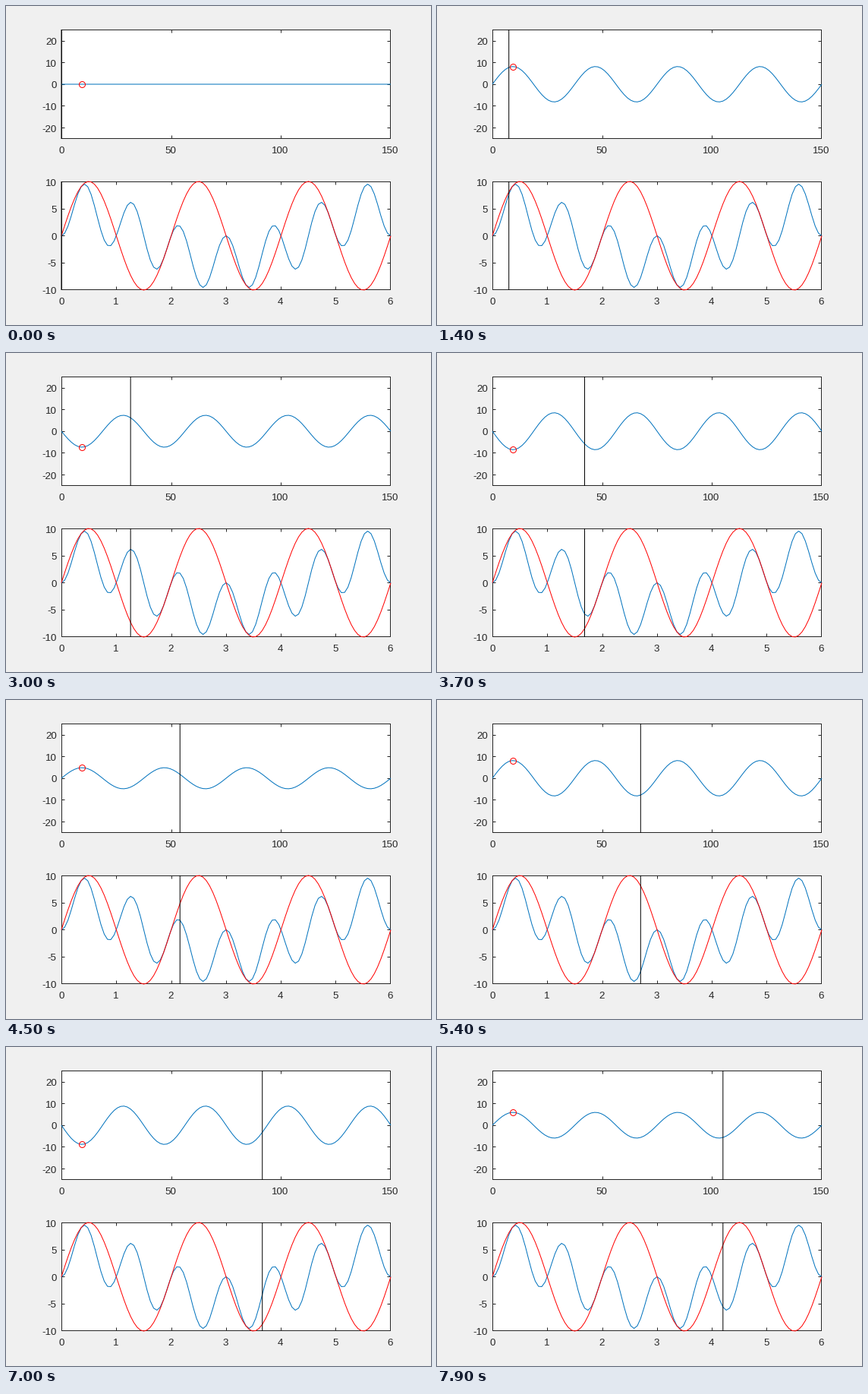
A matplotlib script for the animation above (8000 ms loop, 560 by 420 pixels).

```python
import numpy as np
import matplotlib.pyplot as plt
from matplotlib.animation import FuncAnimation
from matplotlib.transforms import ScaledTranslation

W, H, DPI = 560, 420, 80
PX = 72 / DPI                     # one pixel in points
BLUE, GREY = "#0072BD", "#262626"
LEFT, RIGHT = 73, 507
AMP, WAVELENGTH, SPEED = 10, 37.5, 25
HOLD, STEP, FRAMES = 9, 0.06, 80

plt.rcParams.update({
    "font.family": "Liberation Sans",
    "font.size": 13.33 * PX,
    "axes.unicode_minus": False,
    "axes.linewidth": PX,
    "axes.edgecolor": GREY,
    "lines.linewidth": PX,
    "lines.solid_capstyle": "butt",
})

fig = plt.figure(figsize=(W / DPI, H / DPI), dpi=DPI, facecolor="#F0F0F0")


def add_axes(left, top, right, bottom, xlim, ylim):
    """Axes placed by pixel edges, measured from the top left corner."""
    ax = fig.add_axes([left / W, 1 - bottom / H, (right - left) / W, (bottom - top) / H])
    ax.set(xlim=xlim, ylim=ylim)
    return ax


def make_plot(top, bottom, xlim, ylim, xticks, yticks):
    # The frame sits on the outermost pixels inside the plot area.
    frame = add_axes(LEFT + 0.2, top + 0.2, RIGHT - 0.6, bottom - 0.6, xlim, ylim)
    frame.set(xticks=xticks, yticks=yticks)
    frame.tick_params(direction="in", top=True, right=True, length=4.34 * PX,
                      width=PX, color=GREY, labelcolor=GREY)
    frame.tick_params(axis="x", pad=10 * PX)
    frame.tick_params(axis="y", pad=6 * PX)
    nudge = ScaledTranslation(-0.5 / DPI, -1 / DPI, fig.dpi_scale_trans)
    for label in frame.get_xticklabels() + frame.get_yticklabels():
        label.set_transform(label.get_transform() + nudge)

    data = add_axes(LEFT, top, RIGHT, bottom, xlim, ylim)
    data.set_axis_off()
    return data


def draw(ax, x, y, color, **style):
    return ax.plot(x, y, color=color, clip_on=False, snap=False, **style)[0]


def height(x, t):
    """Standing wave at place x and time t."""
    return AMP * np.sin(np.pi * t) * np.sin(2 * np.pi * x / WAVELENGTH)


space = make_plot(31, 175, (0, 150), (-25, 25),
                  range(0, 151, 50), range(-20, 21, 10))
time = make_plot(231, 374, (0, 6), (-10, 10),
                 range(7), range(-10, 11, 5))

xs = np.linspace(0, 150, 101)
ts = np.linspace(0, 6, 101)
crest = WAVELENGTH / 4

wave = draw(space, xs, 0 * xs, BLUE)
ring = draw(space, [crest], [0], "red", marker="o", markersize=8 * PX,
            markerfacecolor="none", markeredgewidth=PX, linestyle="none")
front = draw(space, [0, 0], [-25, 25], "black")

draw(time, ts, height(SPEED * ts, ts), BLUE)
draw(time, ts, height(crest, ts), "red")
cursor = draw(time, [0, 0], [-10, 10], "black")


def update(frame):
    t = STEP * max(0, frame - HOLD)
    wave.set_ydata(height(xs, t))
    ring.set_ydata([height(crest, t)])
    front.set_xdata([SPEED * t] * 2)
    cursor.set_xdata([t, t])
    return wave, ring, front, cursor


anim = FuncAnimation(fig, update, frames=FRAMES, interval=100,
                     repeat=True, repeat_delay=0, blit=False)
plt.show()
```
